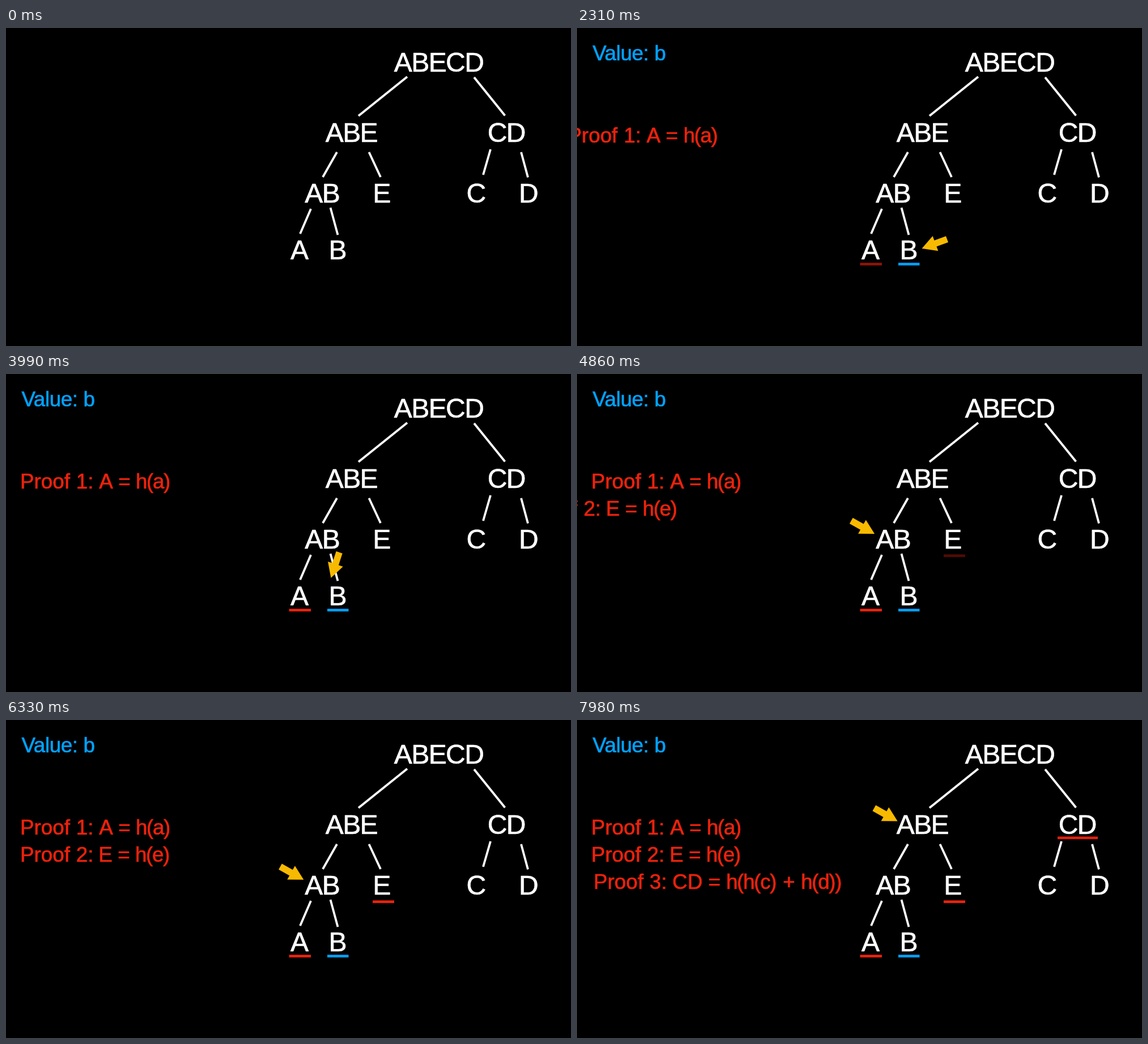
An HTML page with a canvas that plays this animation: 997x561 px, repeating every 8 s.

```html
<!DOCTYPE html>
<html lang="en">
<head>
<meta charset="utf-8">
<title>Hash tree proof</title>
<style>
  html, body { margin: 0; width: 100%; height: 100%; overflow: hidden; background: #000; }
  canvas { display: block; width: 997px; height: 561px; }
</style>
</head>
<body>
<canvas id="stage" width="997" height="561"></canvas>
<script>
const ctx = document.getElementById('stage').getContext('2d');
const LOOP = 8000, STEP = 30, SPAN = 900;
const BLUE = '#00a2ff', RED = '#ee220c', GOLD = '#f8ba00';
const FONT = '"Liberation Sans", Arial, sans-serif';

// label, centre x, baseline
const nodes = [
  ['ABECD', 763.5, 76.6], ['ABE', 609.2, 200.6], ['CD', 883.7, 200.6],
  ['AB', 557.5, 307.6], ['E', 663.7, 307.6], ['C', 830, 307.6], ['D', 923, 307.6],
  ['A', 518, 407.6], ['B', 586, 407.6]
];

const edges = [
  [708, 86, 622, 155], [826, 87, 880.5, 154.5],
  [584, 219, 559, 263], [640.5, 219, 661, 263],
  [855, 214, 842, 259], [909, 219, 921, 263.5],
  [538, 319, 519, 363], [572.5, 317, 585.5, 365]
];

// each proof is a list of [word, offset from the line start]
const proof = (n, ...rest) => [['Proof', 0], [n + ':', 98.8], ...rest];
const reveals = [
  { at: 0, color: BLUE, y: 57, x: 27.4, travel: 152,
    words: [['Value: b', 0]], bar: [567, 414.2, 37.5] },
  { at: 1800, color: RED, y: 202, x: 25, travel: 282,
    words: proof(1, ['A', 139.2], ['=', 173.2], ['h(a)', 204]), bar: [499.5, 414.2, 38.5] },
  { at: 4500, color: RED, y: 250, x: 25, travel: 282,
    words: proof(2, ['E', 138.2], ['=', 172.2], ['h(e)', 203]), bar: [647, 318.3, 38] },
  { at: 7200, color: RED, y: 298, x: 25, travel: 451,
    words: proof(3, ['CD', 139], ['=', 202.5], ['h(h(c)', 234], ['+', 334], ['h(d))', 366]),
    bar: [848, 205.6, 71] }
];

// arrow poses: centre and angle in degrees
const poses = [
  { x: 630.8, y: 380.8, a: 159.8 },
  { x: 504.5, y: 270.5, a: 29.3 },
  { x: 545, y: 167, a: 29.3 }
];

const clamp = v => Math.min(1, Math.max(0, v));
const ease = p => (1 - Math.cos(Math.PI * p)) / 2;
const mix = (a, b, k) => a + (b - a) * k;
const progress = (t, start) => clamp((t - start) / SPAN);

// steady slide in from the left, a small overshoot, then a soft return
function slide(p, travel) {
  const turn = 0.69, over = 11;
  return p < turn ? mix(-travel, over, p / turn)
                  : over * (1 - ease((p - turn) / (1 - turn)));
}

function setFont(size, spacing) {
  ctx.font = `${size}px ${FONT}`;
  ctx.letterSpacing = spacing + 'px';
}

// a hairline outline gives the letters a slightly heavier weight
function write(text, x, y, color) {
  ctx.fillStyle = ctx.strokeStyle = color;
  ctx.lineWidth = 0.7;
  ctx.fillText(text, x, y);
  ctx.strokeText(text, x, y);
}

function drawTree() {
  ctx.strokeStyle = '#fff';
  ctx.lineWidth = 3.8;
  ctx.beginPath();
  for (const [x1, y1, x2, y2] of edges) {
    ctx.moveTo(x1, y1);
    ctx.lineTo(x2, y2);
  }
  ctx.stroke();
  setFont(48, -1.6);
  for (const [label, cx, y] of nodes) {
    const m = ctx.measureText(label);
    write(label, cx - (m.actualBoundingBoxRight - m.actualBoundingBoxLeft) / 2, y, '#fff');
  }
}

function drawReveal(r, t) {
  const p = progress(t, r.at);
  if (p <= 0) return;
  const left = r.x + slide(p, r.travel);
  for (const [word, dx] of r.words) {
    setFont(36.8, word.includes('(') ? -1.4 : word.length > 5 ? -0.4 : 0);
    write(word, left + dx, r.y, r.color);
  }
  const [x, y, w] = r.bar;
  ctx.globalAlpha = ease(p);
  ctx.fillRect(x, y, w, 4.6);
  ctx.globalAlpha = 1;
}

function drawArrow(t) {
  const first = ease(progress(t, 3600)), second = ease(progress(t, 6300));
  const at = key => mix(mix(poses[0][key], poses[1][key], first), poses[2][key], second);
  ctx.save();
  ctx.globalAlpha = ease(progress(t, 0));
  ctx.translate(at('x'), at('y'));
  ctx.rotate(at('a') * Math.PI / 180);
  ctx.fillStyle = GOLD;
  ctx.beginPath();
  ctx.moveTo(23.7, 0);
  ctx.lineTo(-1.8, -14);
  ctx.lineTo(-1.8, -5.8);
  ctx.lineTo(-23.7, -5.8);
  ctx.lineTo(-23.7, 5.8);
  ctx.lineTo(-1.8, 5.8);
  ctx.lineTo(-1.8, 14);
  ctx.closePath();
  ctx.fill();
  ctx.restore();
}

function draw(now) {
  const t = Math.floor((now % LOOP) / STEP) * STEP;
  ctx.fillStyle = '#000';
  ctx.fillRect(0, 0, 997, 561);
  drawTree();
  for (const r of reveals) drawReveal(r, t);
  drawArrow(t);
}

let start = null;
function tick(now) {
  if (start === null) start = now;
  draw(now - start);
  requestAnimationFrame(tick);
}
ctx.lineJoin = 'round';
draw(0);
requestAnimationFrame(tick);
</script>
</body>
</html>
```
